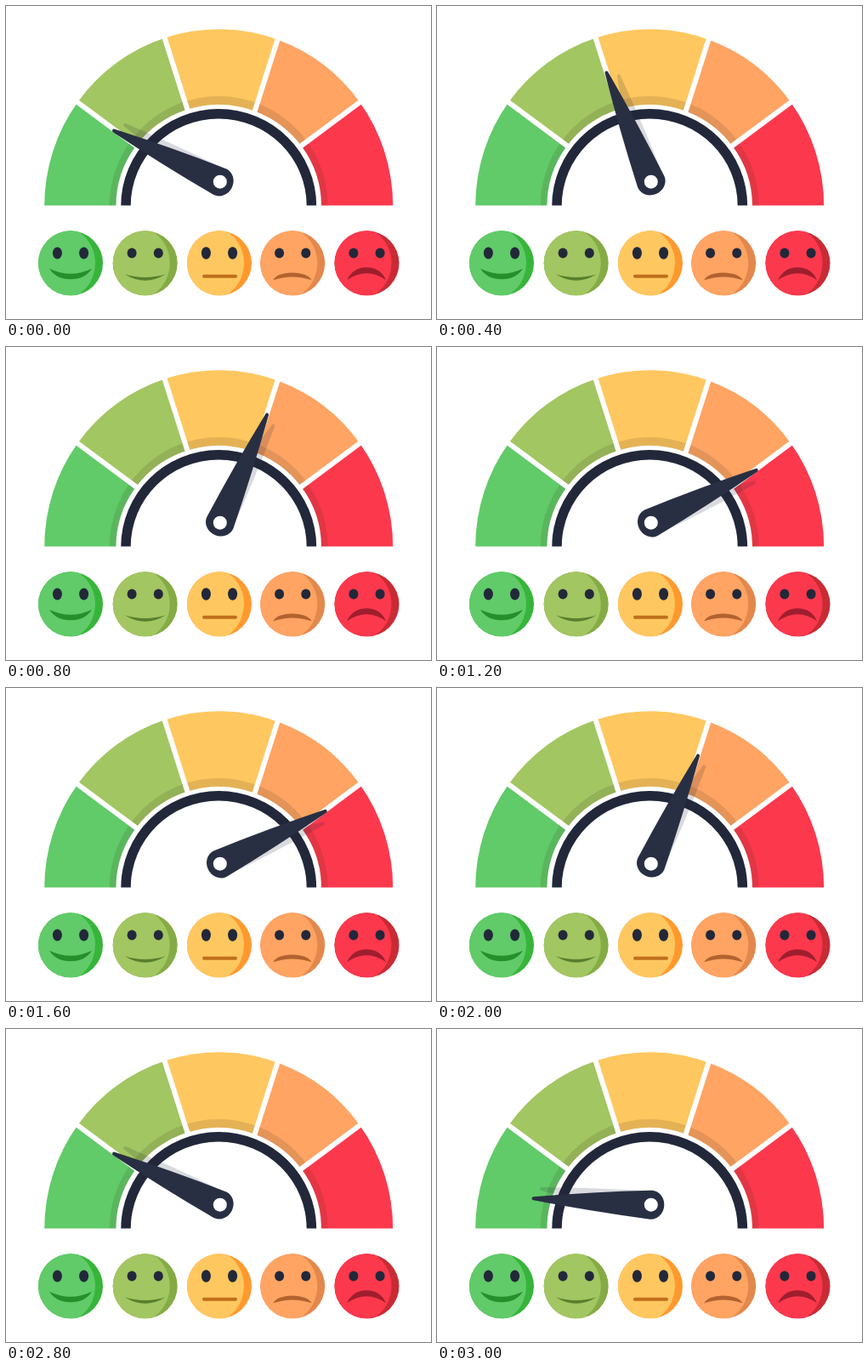
An HTML page for the animation above (3.2 s loop, 500 by 368 pixels).

```html
<!DOCTYPE html>
<html lang="en">
<head>
<meta charset="utf-8">
<title>Mood gauge</title>
<style>
html, body { margin: 0; width: 100%; height: 100%; overflow: hidden; background: #fff; }
svg { display: block; width: 500px; height: 368px; }
</style>
</head>
<body>
<svg viewBox="0 0 500 368">
  <defs>
    <clipPath id="disc"><circle r="38"/></clipPath>
    <clipPath id="upper"><rect width="500" height="234.6"/></clipPath>
  </defs>
  <g id="gauge" clip-path="url(#upper)"></g>
  <g id="faces"></g>
  <g transform="translate(251.8 206.7)">
    <g id="needle">
      <path id="shade" fill="#20263a" opacity=".17" transform="rotate(5.2)"/>
      <path id="hand" fill="#292f43"/>
    </g>
    <circle r="8" fill="#fff"/>
  </g>
</svg>
<script>
const $ = id => document.getElementById(id);
const INK = '#22283a';
const CX = 250.2, CY = 235;

// Point on an ellipse; 0 degrees is left, 90 is up
function at(deg, rx, ry) {
  const a = deg * Math.PI / 180;
  return `${(CX - rx * Math.cos(a)).toFixed(2)} ${(CY - ry * Math.sin(a)).toFixed(2)}`;
}

function sector(from, to, [ox, oy], [ix, iy], fill) {
  return `<path fill="${fill}" d="M${at(from, ox, oy)}A${ox} ${oy} 0 0 1 ${at(to, ox, oy)}` +
    `L${at(to, ix, iy)}A${ix} ${iy} 0 0 0 ${at(from, ix, iy)}Z"/>`;
}

const moods = [
  { x: 76, main: '#60cb68', side: '#36b53a', lip: '#258f2b', eye: 7,
    mouth: 'M-25 6.5Q0 18.5 25 6.5Q17 19 0 19Q-17 19 -25 6.5Z' },
  { x: 163.7, main: '#a2c661', side: '#85ab45', lip: '#587f2d', eye: 6,
    mouth: 'M-24 13Q0 20.5 24 13Q0 28 -24 13Z' },
  { x: 251, main: '#ffc75f', side: '#ff992e', lip: '#c0701d', eye: 7.3,
    mouth: 'M-18 13.5H19A2 2 0 0 1 19 17.5H-18A2 2 0 0 1 -18 13.5Z' },
  { x: 337.2, main: '#ffa463', side: '#e3884d', lip: '#b1622f', eye: 6,
    mouth: 'M-23 20Q-18 11.5 -.5 11.2Q17 11.5 22.5 20Q0 12.3 -23 20Z' },
  { x: 424.5, main: '#fc384d', side: '#c92b34', lip: '#9f1e2d', eye: 6,
    mouth: 'M-23.5 20Q-16 5 -.5 5Q16 5 22.5 20Q0 4 -23.5 20Z' }
];

// Sector borders; the third gap is a little off the radial line
const borders = [0, 36, 72, 110.3, 144, 180];
const sectors = moods.map((m, i) =>
  sector(borders[i], borders[i + 1], [205, 207.7], [120.8, 119], m.main)).join('');
const gaps = [36, 72, 108, 144].map(d =>
  `<path d="M${at(d, 114, 114)}L${at(d, 212, 214)}" stroke="#fff" stroke-width="6"` +
  `${d === 108 ? ' transform="translate(6.3)"' : ''}/>`).join('');
$('gauge').innerHTML = sectors +
  sector(0, 180, [128.5, 129], [120.8, 119], 'rgba(50,40,20,.13)') + gaps +
  sector(0, 180, [115, 114], [103.5, 102.5], INK);

$('faces').innerHTML = moods.map(m => `<g transform="translate(${m.x} 302.3)">
  <circle r="38" fill="${m.side}"/>
  <g clip-path="url(#disc)"><circle cx="-16" r="45" fill="${m.main}"/></g>
  <ellipse cx="-15.6" cy="-11.8" rx="5.5" ry="${m.eye}" fill="${INK}"/>
  <ellipse cx="15.6" cy="-11.8" rx="5.5" ry="${m.eye}" fill="${INK}"/>
  <path d="${m.mouth}" fill="${m.lip}"/>
</g>`).join('');

// Tapered hand with slightly bulging sides and a flattened hub
function hand(len, hub, back, tip) {
  const far = len - tip, mid = -far / 2, bulge = (hub + tip) / 2 + 2;
  return `M${-hub} 0Q${-bulge} ${mid} ${-tip} ${-far}A${tip} ${tip} 0 0 1 ${tip} ${-far}` +
    `Q${bulge} ${mid} ${hub} 0A${hub} ${back} 0 0 1 ${-hub} 0Z`;
}
$('hand').setAttribute('d', hand(140.5, 17, 15.5, 2));
$('shade').setAttribute('d', hand(132, 16, 15, 2));

// The hand sweeps right and back, one jump every 200 ms
const sweep = [-64.3, -43.5, -22.2, 0.5, 23.5, 43.5, 63.5, 86.5];
const angles = [...sweep, ...sweep.slice(0, 7).reverse(), -86.9];
const STEP = 200;

function draw(now) {
  const i = Math.floor(now / STEP) % angles.length;
  $('needle').setAttribute('transform', `rotate(${angles[i]})`);
}
const start = performance.now();
function tick() {
  draw(performance.now() - start);
  requestAnimationFrame(tick);
}
draw(0);
requestAnimationFrame(tick);
</script>
</body>
</html>
```
